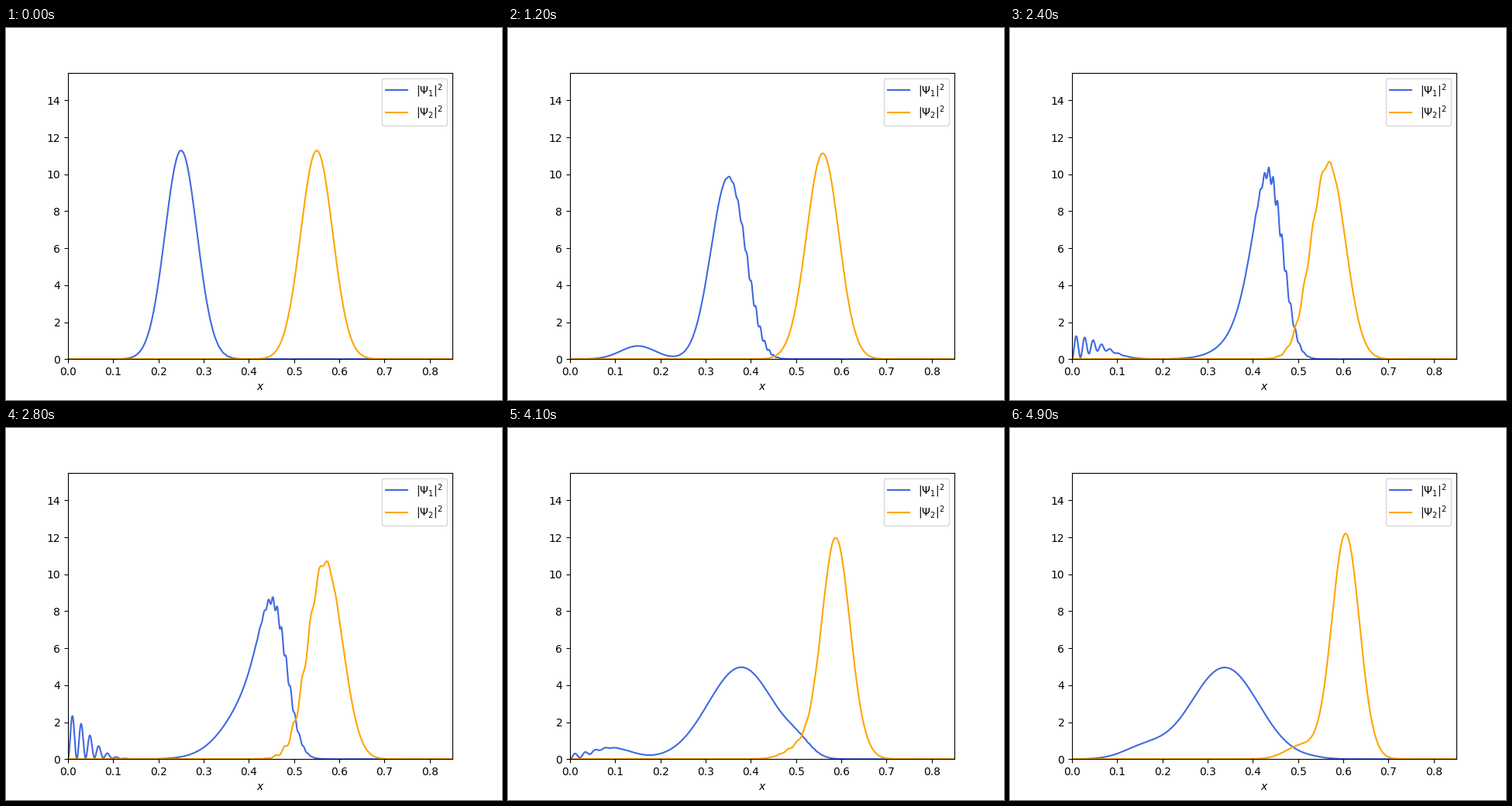
Write a matplotlib script that moves like this. It is 640x480 px and loops after 5 s.

```python
import numpy as np
import matplotlib.pyplot as plt
from matplotlib.animation import FuncAnimation

FRAMES, INTERVAL = 50, 100
X = np.linspace(0, 0.85, 1021)

START_1, START_2 = 0.25, 0.55
SPEED_1, SPEED_2 = 0.00833, 0.00083   # distance per frame
VARIANCE = 0.05 ** 2 / 2
FORWARD, BACKWARD = 0.932, 0.068      # weights of the two opposite movers
CONTACT, SOFTNESS = 0.10, 0.008
LAG = 0.016


def gauss(x, mean, variance):
    return np.exp(-(x - mean) ** 2 / (2 * variance)) / np.sqrt(2 * np.pi * variance)


def bump(x, centre, width):
    return np.exp(-((x - centre) / width) ** 2)


def colliding_pair(t, var_1, var_2):
    """Marginals of a light packet bouncing off one ten times heavier."""
    mean_1, mean_2 = START_1 + SPEED_1 * t, START_2 + SPEED_2 * t
    var_sum = var_1 + var_2
    offset = np.linspace(-5, 5, 401) * np.sqrt(var_sum)
    weight = gauss(offset, 0, var_sum) * (offset[1] - offset[0])

    # z is the free separation measured from the contact distance
    z = mean_1 - mean_2 + offset + CONTACT
    gap = -CONTACT - SOFTNESS * np.logaddexp(z / SOFTNESS, -z / SOFTNESS)
    slope = (var_1 - 10 * var_2) / (11 * var_sum)
    centre = (mean_1 + 10 * mean_2) / 11 + slope * offset
    centre = centre - LAG / 2 * (1 + np.tanh((z - 0.025) / 0.03))
    spread = var_1 * var_2 / var_sum

    light = gauss(X[:, None], centre + 10 * gap / 11, spread) @ weight
    heavy = gauss(X[:, None], centre - gap / 11, spread) @ weight
    return light, heavy


def wall_packet(centre, variance):
    """Packet running left and interfering with its reflection at x = 0."""
    k = 157.5 + 190 * centre
    direct, mirrored = gauss(X, centre, variance), gauss(-X, centre, variance)
    return direct + mirrored - 2 * np.sqrt(direct * mirrored) * np.cos(2 * k * X)


def densities(t):
    var_1 = VARIANCE * (1 + 0.014 * t)
    var_2 = VARIANCE * (1 + 0.0004 * t)
    light, heavy = colliding_pair(t, var_1, var_2)
    back_1, back_2 = START_1 - SPEED_1 * t, START_2 - SPEED_2 * t

    crest = 0.4015 + 0.00445 * (t - 12)
    ripple_1 = (0.48 * bump(t, 21, 11) * bump(X, crest, 0.035)
                * np.cos(2 * np.pi * (X - crest) / 0.00985))
    crest = 0.473 - 0.0087 * (t - 33)
    ripple_2 = (0.33 * bump(back_1, 0, 0.07) * bump(X, back_2, 0.05)
                * np.cos(2 * np.pi * (X - crest) / 0.0195))

    rho_1 = FORWARD * light + BACKWARD * wall_packet(back_1, var_1) + ripple_1
    rho_2 = FORWARD * heavy + BACKWARD * gauss(X, back_2, var_2) + ripple_2
    return np.maximum(rho_1, 0), np.maximum(rho_2, 0)


fig, ax = plt.subplots(figsize=(6.4, 4.8), dpi=100)
line_1, = ax.plot([], [], color="royalblue", label=r"$|\Psi_1|^2$")
line_2, = ax.plot([], [], color="orange", label=r"$|\Psi_2|^2$")
ax.set_xlim(0, 0.85)
ax.set_ylim(0, 15.5)
ax.set_xlabel(r"$x$")
ax.legend(loc="upper right")


def update(frame):
    rho_1, rho_2 = densities(frame)
    line_1.set_data(X, rho_1)
    line_2.set_data(X, rho_2)
    return line_1, line_2


anim = FuncAnimation(fig, update, frames=FRAMES, interval=INTERVAL,
                     repeat=True, repeat_delay=0)
plt.show()
```
